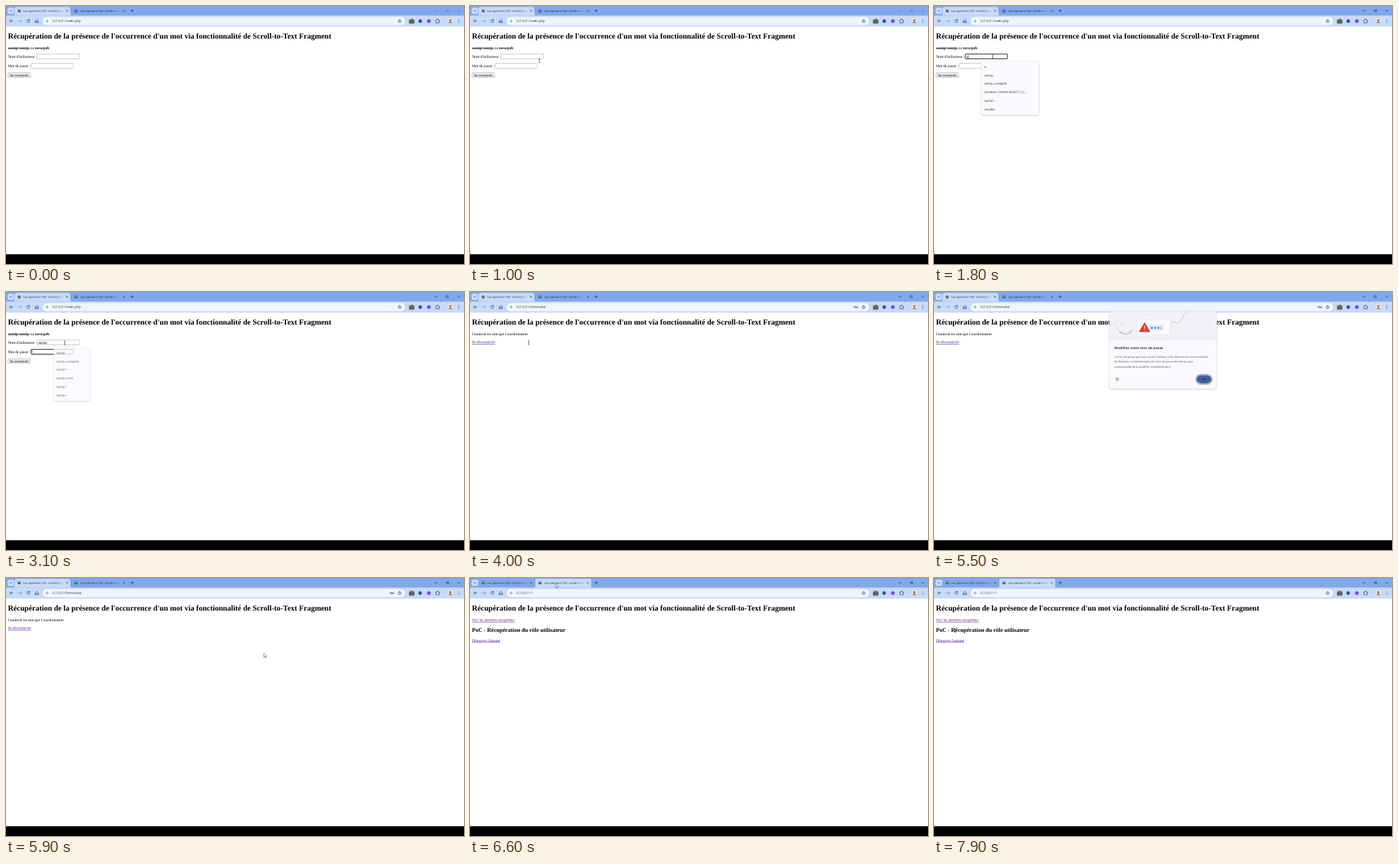
These frames come from a looping animation (690 by 388 pixels, 8000 ms). An HTML page:

```html
<!DOCTYPE html>
<html lang="fr">
<head>
<meta charset="utf-8">
<title>Scroll-to-Text Fragment</title>
<style>
html, body { margin: 0; width: 100%; height: 100%; overflow: hidden; background: #fff; }
svg { display: block; width: 100vw; height: 100vh; }
text { white-space: pre; text-rendering: geometricPrecision; }
.serif { font-family: "Liberation Serif", "Times New Roman", serif; font-size: 5.75px; fill: #000; }
.bold { font-weight: 700; }
.link { fill: #551a8b; text-decoration: underline; }
.ui { font-family: "Open Sans", "Noto Sans", sans-serif; fill: #26282c; }
.form { font-family: "Liberation Sans", Arial, sans-serif; font-size: 4.79px; fill: #000; }
.line { fill: none; stroke: #2c3647; stroke-width: .7; stroke-linecap: round; stroke-linejoin: round; }
</style>
</head>
<body>
<svg id="stage" viewBox="0 0 690 388" preserveAspectRatio="none"></svg>
<script>
const LOOP = 8000, STEP = 100;
const stage = document.getElementById("stage");

const text = (x, y, str, cls, size, extra = "") =>
  `<text x="${x}" y="${y}" class="${cls}"${size ? ` style="font-size:${size}px"` : ""} ${extra}>${str}</text>`;
const rect = (x, y, w, h, fill, r = 0, extra = "") =>
  `<rect x="${x}" y="${y}" width="${w}" height="${h}" rx="${r}" fill="${fill}" ${extra}/>`;
const circle = (x, y, r, fill, extra = "") =>
  `<circle cx="${x}" cy="${y}" r="${r}" fill="${fill}" ${extra}/>`;
const line = (d, extra = "") => `<path class="line" d="${d}" ${extra}/>`;
const group = (id, body, extra = "") => `<g id="${id}" ${extra}>${body}</g>`;
const cross = (x, y, r) => `M${x - r} ${y - r}l${2 * r} ${2 * r}m0 ${-2 * r}l${-2 * r} ${2 * r}`;

// Browser window
const tabShape = x =>
  `M${x - 3} 14.6Q${x} 14.6 ${x} 11.6V4.4Q${x} 1.2 ${x + 3.2} 1.2H${x + 80.8}` +
  `Q${x + 84} 1.2 ${x + 84} 4.4V11.6Q${x + 84} 14.6 ${x + 87} 14.6Z`;

function tabLabel(x) {
  return circle(x + 7, 7.3, 2.4, "#4b5058") +
    `<path d="M${x + 5.6} 6.5q1.2-1.6 2.4-.5t-.6 1.7z" fill="#b9c3d3"/>` +
    `<g mask="url(#fade${x})">${text(x + 13, 8.8, "Les injections CSS - Scroll-to-Text", "ui", 4.2)}</g>` +
    line(cross(x + 79, 7.2, 1.2), 'style="stroke-width:.6"');
}

const fadeMask = x =>
  `<linearGradient id="grad${x}" gradientUnits="userSpaceOnUse" x1="${x + 62}" x2="${x + 74}">` +
  `<stop offset="0" stop-color="#fff"/><stop offset="1" stop-color="#000"/></linearGradient>` +
  `<mask id="fade${x}" maskUnits="userSpaceOnUse" x="${x}" y="0" width="84" height="15">` +
  rect(x, 0, 84, 15, `url(#grad${x})`) + `</mask>`;

function starPath(x, y, r) {
  let d = "";
  for (let i = 0; i < 10; i++) {
    const a = -Math.PI / 2 + i * Math.PI / 5, q = i % 2 ? r * .45 : r;
    d += (i ? "L" : "M") + (x + q * Math.cos(a)).toFixed(2) + " " + (y + q * Math.sin(a)).toFixed(2);
  }
  return d + "Z";
}

function chrome() {
  const dots = [20.6, 22.6, 24.6].map(y => circle(682, y, .55, "#2c3647")).join("");
  return rect(0, 0, 690, 15, "#80a8ea") +
    rect(2.4, 2.4, 10, 9.6, "#c9dbf9", 3) + line("M5.9 6.5l1.5 1.5 1.5-1.5") +
    `<path id="activeTab" fill="#c7daf9"/>` +
    tabLabel(13) + tabLabel(98.5) +
    line("M188.2 7.2h4M190.2 5.2v4") +
    group("controls",
      line("M646.8 7.2h3.2") + line("M663.5 6.2h2.5v2.5h-2.5zM664.3 6v-.7h2.5v2.5h-.6", 'style="stroke-width:.5"') +
      line(cross(682, 7.2, 1.5), 'style="stroke-width:.6"')) +
    rect(0, 14.4, 690, 16.6, "#c7daf9") +
    line("M10.3 22.6H5.8M7.8 20.5l-2 2.1 2 2.1") +
    line("M18.8 22.6h4.5M21.3 20.5l2 2.1-2 2.1", 'opacity=".45"') +
    line("M35.5 21.5A2.2 2.2 0 1 0 35.6 23.4M35.7 20v1.7h-1.7") +
    line("M44.3 22.1l2.2-1.9 2.2 1.9v2.9h-1.5v-1.7h-1.4v1.7h-1.5z") +
    rect(55.4, 16.5, 546, 12.4, "#eff4fd", 6.2) +
    circle(62, 22.6, 4.6, "#fff") + circle(62, 22.6, 1.9, "none", 'stroke="#4a5362" stroke-width=".5"') +
    line("M62 22.5v1M62 21.6v.05", 'style="stroke-width:.5"') +
    text(69, 24.4, "", "ui", 4.75, 'id="url"') +
    group("key", circle(579.8, 22.6, 1.3, "none", 'stroke="#2c3647" stroke-width=".7"') + line("M581.2 22.6h3v1.2M582.8 22.6v1")) +
    `<path class="line" d="${starPath(593, 22.8, 2.6)}" style="stroke-width:.6"/>` +
    rect(607, 20.4, 8.4, 6, "#62635f", 1) + rect(609, 19, 4.4, 2, "#857e67", .6) +
    circle(624, 22.7, 2.6, "#35507b") + circle(637, 22.7, 2.7, "#8145d7") +
    line("M648 21h1.4a.9.9 0 1 1 1.6 0h1.4v1.4a.9.9 0 1 1 0 1.5v1.4h-4.4z") +
    line("M660.5 19.8v5.6", 'style="stroke:#9fb9e6;stroke-width:.5"') +
    circle(669.3, 22.6, 4.1, "#efe5df") + circle(669.3, 21.3, 1.4, "#68483e") +
    `<path d="M666.6 25.7q.4-2.8 2.7-2.8t2.7 2.8z" fill="#c9773f"/>` + dots;
}

// Web pages
const input = (id, x, y) =>
  rect(x, y, 63.6, 7.2, "#fff", .7, `id="${id}" stroke="#767676" stroke-width=".4"`);

function pages() {
  const login =
    text(2.9, 65, "aomip/aomip<tspan font-weight=\"400\"> ou </tspan>tovu/peb", "serif bold") +
    text(2.9, 77.7, "Nom d'utilisateur :", "serif") + input("user", 47.1, 72.2) +
    text(2.9, 91.7, "Mot de passe :", "serif") + input("pass", 37.7, 86.3) +
    text(48.9, 77.5, "", "form", 0, 'id="userText"') + group("dots", "") +
    `<path id="caret" stroke="#000" stroke-width=".4"/>` +
    rect(2.9, 100.3, 34, 7, "#efefef", 1, 'stroke="#767676" stroke-width=".4"') +
    text(19.9, 105.5, "Se connecter", "form", 0, 'text-anchor="middle"');
  const home = text(2.9, 65, "Connecté en tant que Coordonnateur", "serif") +
    text(2.9, 77.2, "Se déconnecter", "serif link");
  const attack = text(2.9, 65, "Voir les données récupérées", "serif link") +
    text(2.9, 81.3, "PoC - Récupération du rôle utilisateur", "serif bold", 8.625) +
    text(2.9, 95.5, "Démarrer l'attaque", "serif link");
  return text(2.9, 49.1, "Récupération de la présence de l'occurrence d'un mot via fonctionnalité de Scroll-to-Text Fragment", "serif bold", 11.5) +
    group("login", login) + group("home", home) + group("attack", attack);
}

const menu = (id, width, items) => group(id,
  rect(71.8, 83.2, width, 80.4, "#fbf9fe", 2.6, 'filter="url(#shadow)"') +
  items.map((s, i) => text(76, 92.6 + i * 12.9, s, "ui", 4.4)).join(""));

// Password warning
function dialog() {
  const art = rect(264.3, 29.5, 161.4, 43.5, "#f1f0f7", 3) +
    line("M264.5 51c4-1 6-6 9-1s9 13 16 13 8-4 8.500-9", 'style="stroke:#d5d5dc;stroke-width:.8"') +
    line("M279 59q5 5 11 4t8-5", 'style="stroke:#b9bac2;stroke-width:1.3"') +
    line("M355 47c9-6 11 4 17-4s3-11 10-13", 'style="stroke:#c3c4cc;stroke-width:1"') +
    line("M281 48.500h4M283 46.500v4", 'style="stroke:#d5d6de"') +
    line("M412 53h1.500M415 53h2.500", 'style="stroke:#d3d4dd"') +
    `<path d="M305 67V39.500q0-1.500 1.500-1.500h4l1.500-2h12l1.500 2v29z" fill="#f7f7fb" stroke="#dfe2e7" stroke-width=".6"/>` +
    line("M310 40.500h11", 'style="stroke:#cfe3d3;stroke-width:.7"') +
    rect(318, 42, 38, 22.5, "#fbfbfe", 1.5, 'stroke="#dfe5ee" stroke-width=".6"') +
    rect(324, 49, 23, 9.5, "#e7effb", 1) +
    [328, 333, 338].map(x => line(`M${x - 1.4} 54h2.8M${x - .7} 52.7l1.4 2.600M${x + .7} 52.7l-1.400 2.600`, 'style="stroke:#3b78d8;stroke-width:.9"')).join("") +
    line("M342.300 52.300v3.600", 'style="stroke:#3b78d8;stroke-width:.8"') +
    `<path d="M317.300 46.200l8 13.600h-16z" fill="#e23c32" stroke="#e23c32" stroke-width="1" stroke-linejoin="round"/>` +
    line("M317.300 51v4.300M317.300 57.500v.1", 'style="stroke:#fff;stroke-width:1.200"');
  const body = [
    "Le mot de passe que vous venez d'utiliser a été détecté lors d'une violation",
    "de données. Le Gestionnaire de mots de passe de Velmio vous",
    "recommande de le modifier immédiatement."
  ].map((s, i) => text(271.8, 99.2 + i * 7.2, s, "ui", 4.08, 'fill-opacity=".8"')).join("");
  return group("dialog",
    rect(264.3, 29.5, 161.4, 115.8, "#fbf9fe", 3, 'filter="url(#shadow)"') + art +
    text(271.8, 86.1, "Modifiez votre mot de passe", "ui", 5.4, 'font-weight="600"') + body +
    circle(276.1, 131.2, 2.1, "none", 'stroke="#3c4048" stroke-width=".55"') +
    line("M276.100 131v1.100M276.100 130.100v.05", 'style="stroke-width:.5"') +
    rect(394.4, 124, 24.6, 14.6, "#fff", 7.3, 'stroke="#3e5e95" stroke-width=".8"') +
    rect(395.6, 125.2, 22.2, 12.2, "#405f96", 6.1) +
    text(406.7, 132.8, "OK", "ui", 4.1, 'text-anchor="middle" font-weight="600" style="fill:#fff;font-size:4.1px"'));
}

const pointer =
  `<path id="arrow" d="M0 0V6.200L1.500 4.900 2.500 7.100 3.400 6.700 2.400 4.500H4.300Z" fill="#fff" stroke="#000" stroke-width=".4"/>` +
  `<path id="beam" d="M-1.200-2.800Q0-2.800 0-2.200V2.200Q0 2.800-1.200 2.800M1.200-2.800Q0-2.800 0-2.200M0 2.200Q0 2.800 1.200 2.800" fill="none" stroke="#111" stroke-width=".6"/>`;

stage.innerHTML =
  `<defs>${fadeMask(13)}${fadeMask(98.5)}<filter id="shadow" x="-10%" y="-10%" width="120%" height="120%">` +
  `<feDropShadow dx="0" dy=".6" stdDeviation=".9" flood-color="#333a4a" flood-opacity=".38"/></filter></defs>` +
  rect(0, 0, 690, 388, "#fff") + pages() + chrome() + rect(0, 373.3, 690, 14.7, "#000") +
  menu("wide", 86.2, ["a", "aomip", "aomip_sunkgate", "atzulkant' UNION SELECT 1,2,...", "aomip' --", "atzulker"]) +
  menu("narrow", 55, ["aomip", "aomip_sunkgate", "aomip' --", "aomip_sunk", "aomip --", "aomip --"]) +
  dialog() + group("cursor", pointer);

const el = {};
stage.querySelectorAll("[id]").forEach(n => el[n.id] = n);

// Motion
const ease = k => k * k * (3 - 2 * k);
const moves = [
  [200, 640, 189], [400, 520, 170], [600, 259, 131], [800, 150, 100], [1100, 88.5, 76.4],
  [4900, 88.5, 76.4], [5400, 412, 130], [5800, 412, 130], [6000, 365, 96], [6400, 129, 8.5],
  [6800, 129, 8.5], [7700, 33, 77.5], [7900, 32, 79.2], [8000, 32, 79.2]
];

function cursorAt(t) {
  const i = Math.max(1, moves.findIndex(m => m[0] > t));
  const [t0, x0, y0] = moves[i - 1], [t1, x1, y1] = moves[i];
  const k = ease(Math.min(1, Math.max(0, (t - t0) / (t1 - t0))));
  return [x0 + (x1 - x0) * k, y0 + (y1 - y0) * k];
}

// Last value whose start time has passed.
const since = (t, steps) => steps.reduce((v, [at, next]) => t >= at ? next : v, steps[0][1]);
const within = (t, a, b) => t >= a && t < b;
const show = (node, on) => node.style.display = on ? "" : "none";

function fade(node, opacity) {
  show(node, opacity > 0);
  node.setAttribute("opacity", opacity);
}

function focus(node, on) {
  node.setAttribute("stroke", on ? "#101010" : "#767676");
  node.setAttribute("stroke-width", on ? .95 : .4);
}

function drawForm(t) {
  const typed = since(t, [[0, ""], [1800, "a"], [1900, "ao"], [2700, "aom"], [2800, "aomi"], [3000, "aomip"]]);
  const hidden = since(t, [[0, 0], [3300, 1], [3400, 2], [3500, 3], [3600, 4], [3800, 5]]);
  const onPass = t >= 3100;
  el.userText.textContent = typed;
  el.dots.innerHTML = Array.from({ length: hidden }, (_, i) => circle(40.5 + i * 1.7, 90, .65, "#000")).join("");
  focus(el.user, within(t, 1400, 3100));
  focus(el.pass, onPass);
  const x = onPass ? 39.5 + hidden * 1.7 : 49 + (typed ? el.userText.getComputedTextLength() : 0);
  el.caret.setAttribute("d", `M${x} ${onPass ? 87.4 : 73.3}v5.2`);
  show(el.caret, t >= 1400 && !within(t, 2500, 2700));
}

function render(t) {
  const view = since(t, [[0, "login"], [4000, "home"], [6500, "attack"]]);
  for (const name of ["login", "home", "attack"]) show(el[name], name === view);
  el.url.innerHTML = "127.0.0.1" + {
    login: "/index.php", home: "/home.php", attack: '<tspan fill-opacity=".55">:81</tspan>'
  }[view];
  el.activeTab.setAttribute("d", tabShape(view === "attack" ? 98.5 : 13));
  show(el.key, view === "home");
  el.controls.setAttribute("opacity", t < 1100 ? .45 : 1);
  if (view === "login") drawForm(t);

  show(el.wide, within(t, 1800, 1900));
  fade(el.narrow, since(t, [[0, 0], [1400, .35], [1500, .75], [1600, 1], [1800, 0], [1900, 1], [3100, .76], [3200, 0]]));

  const open = since(t, [[0, 0], [4200, .2], [4300, .5], [4400, .85], [4500, 1], [5700, .5], [5800, 0]]);
  const shift = 2 * (1 - open);
  fade(el.dialog, open);
  el.dialog.setAttribute("transform",
    `translate(345 ${140 - shift * 1.5}) scale(${1 + shift * .02}) translate(-345 -140)`);

  const [x, y] = cursorAt(t);
  const beam = within(t, 1000, 5100) || t >= 7700;
  show(el.cursor, t >= 300 && !within(t, 5400, 5800));
  show(el.beam, beam);
  show(el.arrow, !beam);
  el.cursor.setAttribute("transform", `translate(${x} ${y})`);
}

const start = performance.now();
function tick() {
  const t = (performance.now() - start) % LOOP;
  render(Math.floor(t / STEP) * STEP);
  requestAnimationFrame(tick);
}
tick();
</script>
</body>
</html>
```
